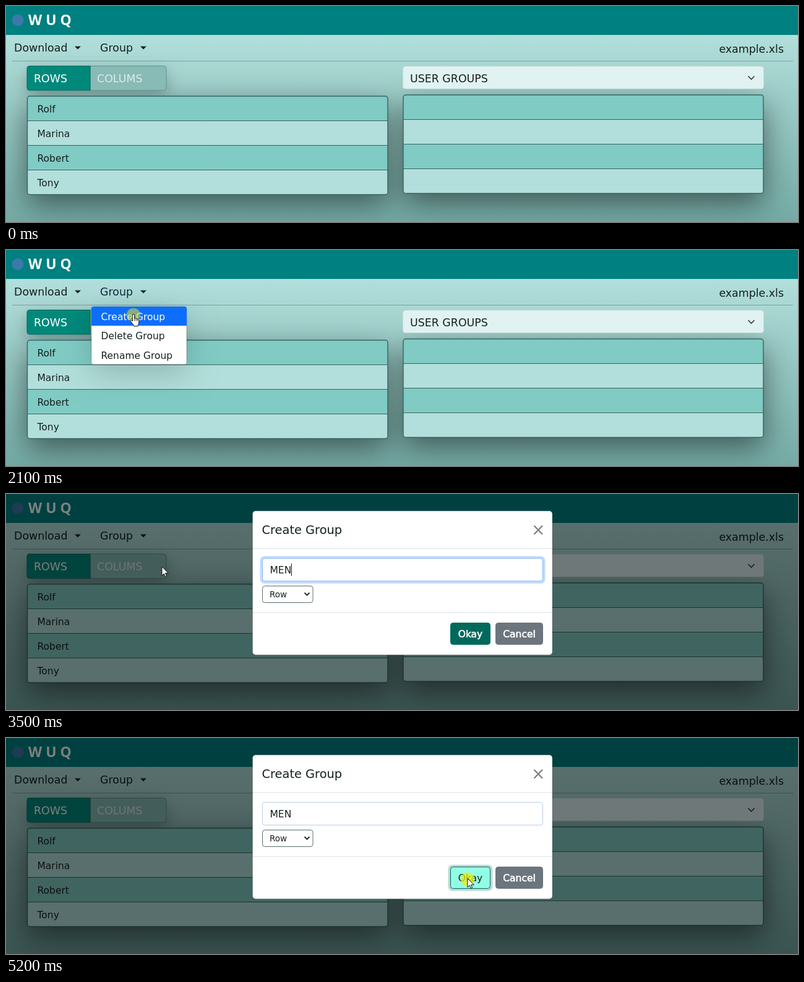
Animation of 1280x351 px, one loop 5.3 s. Source, as an HTML page with a canvas:

```html
<!DOCTYPE html>
<html lang="en">
<head>
<meta charset="utf-8">
<title>Group editor</title>
<style>
  html, body { margin: 0; width: 100%; height: 100%; overflow: hidden; background: #008080; }
  canvas { display: block; width: 1280px; height: 351px; }
</style>
</head>
<body>
<canvas id="stage" width="1280" height="351"></canvas>
<script>
const ctx = document.getElementById('stage').getContext('2d');
const LOOP = 5300, STEP = 100;
const SANS = '"DejaVu Sans", Verdana, sans-serif';
const SMALL = 15.5, MEDIUM = 17.4, LARGE = 19.4;
const INK = '#16211f', BORDER = '#35655f';
const HAND = new Path2D('M4 12V2a1.6 1.6 0 0 1 3.2 0v5.5a1.4 1.4 0 0 1 2.6.6a1.3 1.3 0 0 1 2.4.7' +
  'a1.2 1.2 0 0 1 2.2.9V14q0 3-1.7 4.5V20H6V18.5L1 12q-1.2-2 .6-2.3 1.2 0 2.4 2z');
const ARROW = new Path2D('M0 0V14.6L3.3 11.5L5.4 16.4L7.6 15.5L5.5 10.7H10.2Z');

// Pointer key positions: time, tip x, tip y
const POINTER = [
  [100, 720, 231], [500, 210, 72],
  [1300, 210, 72], [1700, 206, 103],
  [2200, 206, 104], [2500, 252, 118],
  [4100, 252, 118], [4700, 746, 228]
];

// y is the vertical centre of the capitals
function label(text, x, y, size, color = INK, align = 'left') {
  ctx.font = `${size}px ${SANS}`;
  ctx.fillStyle = color;
  ctx.textAlign = align;
  ctx.fillText(text, x, Math.round(y + size * 0.365));
}

function box(x, y, w, h, fill, stroke, radius = 4) {
  ctx.beginPath();
  ctx.roundRect(x, y, w, h, radius);
  ctx.fillStyle = fill;
  ctx.fill();
  if (!stroke) return;
  ctx.strokeStyle = stroke;
  ctx.lineWidth = 1;
  ctx.stroke();
}

function withShadow(alpha, blur, offset, draw) {
  ctx.save();
  ctx.shadowColor = `rgba(0,0,0,${alpha})`;
  ctx.shadowBlur = blur;
  ctx.shadowOffsetY = offset;
  draw();
  ctx.restore();
}

function polyline(points, color, width) {
  ctx.beginPath();
  points.forEach(([x, y]) => ctx.lineTo(x, y));
  ctx.strokeStyle = color;
  ctx.lineWidth = width;
  ctx.stroke();
}

function chevron(x, y, w, h, width) {
  polyline([[x, y], [x + w / 2, y + h], [x + w, y]], '#2b3335', width);
}

function caretDown(x, color) {
  ctx.beginPath();
  ctx.moveTo(x, 65.5);
  ctx.lineTo(x + 10, 65.5);
  ctx.lineTo(x + 5, 70.5);
  ctx.fillStyle = color;
  ctx.fill();
}

function list(x, y, w, names) {
  ctx.save();
  ctx.beginPath();
  ctx.roundRect(x, y, w, 160, 4);
  ctx.clip();
  for (let i = 0; i < 4; i++) {
    ctx.fillStyle = i % 2 ? '#b2dfdb' : '#80cbc4';
    ctx.fillRect(x, y + i * 40, w, 40);
    if (i) polyline([[x, y + i * 40], [x + w, y + i * 40]], BORDER, 1);
    if (names) label(names[i], x + 16, y + i * 40 + 20.5, SMALL);
  }
  ctx.restore();
  ctx.beginPath();
  ctx.roundRect(x, y, w, 160, 4);
  ctx.strokeStyle = BORDER;
  ctx.lineWidth = 1.4;
  ctx.stroke();
}

function drawPage(groupColor) {
  const shade = ctx.createLinearGradient(0, 47, 0, 351);
  shade.addColorStop(0, '#b2dfdb');
  shade.addColorStop(1, '#74aaa4');
  ctx.fillStyle = shade;
  ctx.fillRect(0, 0, 1280, 351);

  withShadow(0.5, 48, 16, () => {
    box(34.5, 146.5, 582.5, 160, '#80cbc4');
    box(642, 144.5, 582, 160, '#80cbc4');
  });

  ctx.fillStyle = '#008080';
  ctx.fillRect(0, 0, 1280, 47);
  ctx.beginPath();
  ctx.arc(19, 23, 9.5, 0, Math.PI * 2);
  ctx.fillStyle = '#3c79a8';
  ctx.fill();
  ctx.font = '600 23px "Noto Sans", "Open Sans", sans-serif';
  ctx.textAlign = 'left';
  ctx.fillStyle = '#fff';
  ctx.fillText('W U Q', 36, 31);

  label('Download', 13, 68, MEDIUM);
  caretDown(111, INK);
  label('Group', 152, 68, MEDIUM, groupColor);
  caretDown(217, groupColor);
  label('example.xls', 1257, 70, MEDIUM, INK, 'right');
  polyline([[10, 89.5], [1272, 89.5]], 'rgba(0,0,0,.25)', 1);

  withShadow(0.25, 26, 8, () => box(34, 97.5, 225, 39.5, '#88bbb5'));
  box(136, 97.5, 123, 39.5, '#88bbb5', '#5d958e', [0, 4, 4, 0]);
  box(34, 97.5, 102, 39.5, '#00897b', '#00695c', [4, 0, 0, 4]);
  label('ROWS', 45, 117.5, MEDIUM, '#fff');
  label('COLUMS', 147, 117.5, MEDIUM, '#d9ecea');

  box(641.5, 98, 583, 36.5, '#e0f2f1', '#c9dcda');
  label('USER GROUPS', 653, 117.5, MEDIUM);
  chevron(1199.5, 114, 10, 5.2, 1.6);

  list(34.5, 146.5, 582.5, ['Rolf', 'Marina', 'Robert', 'Tony']);
  list(642, 144.5, 582);
}

function drawMenu(hovered) {
  withShadow(0.175, 48, 16, () => box(138, 92, 154, 94, '#fff'));
  box(138, 92, 154, 94, '#fff', 'rgba(0,0,0,.25)');
  if (hovered) box(138, 92, 154, 31, '#0d6efd', null, [3, 3, 0, 0]);
  ['Create', 'Delete', 'Rename'].forEach((verb, i) =>
    label(verb + ' Group', 153.5, 108 + i * 31.5, SMALL, hovered && !i ? '#fff' : INK));
}

function button(text, x, w, fill, color, stroke) {
  box(x + 0.5, 209.5, w - 1, 35, fill, stroke);
  label(text, x + w / 2, 227.5, SMALL, color, 'center');
  if (color === '#fff') {
    ctx.strokeStyle = color;
    ctx.lineWidth = 0.6;
    ctx.strokeText(text, x + w / 2, Math.round(227.5 + SMALL * 0.365));
  }
}

function drawDialog(t) {
  const pressed = t >= 5100, hovered = t >= 4700;
  ctx.fillStyle = 'rgba(0,0,0,.5)';
  ctx.fillRect(0, 0, 1280, 351);
  box(398.5, 27.5, 484.5, 234, '#fff', 'rgba(0,0,0,.2)', 5);
  label('Create Group', 413.5, 58, LARGE);
  polyline([[853.5, 51.5], [867, 65.5]], '#7c7c7c', 2.2);
  polyline([[867, 51.5], [853.5, 65.5]], '#7c7c7c', 2.2);
  [88.5, 192.5].forEach(y => polyline([[399, y], [883, y]], '#dee2e6', 1));

  if (!pressed) box(410.5, 101, 461, 44.5, '#c2dbfe', null, 7);
  box(414.5, 104.5, 453, 37, '#fff', pressed ? '#b9cde6' : '#86b7fe');
  const typed = 'MEN'.slice(0, t < 3100 ? 0 : Math.floor((t - 3100) / 200) + 1);
  label(typed || 'Group Name', 426.5, 123, SMALL, typed ? INK : '#6c757d');
  const caretOn = t < 2900 || (t >= 3100 && t < 3900) || (t >= 4400 && t < 4700);
  if (caretOn) {
    const x = Math.floor(427 + (typed ? ctx.measureText(typed).width : 0));
    ctx.fillStyle = INK;
    ctx.fillRect(x, 113, 1, 20);
  }

  box(414.5, 149.5, 81.5, 27, '#fff', '#56706d');
  label('Row', 426, 163.5, 13.5);
  chevron(482.5, 160.5, 8, 4, 2);

  if (pressed) box(714.5, 206, 72, 42.5, '#bfd9d5', null, 7);
  if (hovered) button('Okay', 718, 65, '#90ffe3', INK, '#00695c');
  else button('Okay', 718, 65, '#00695c', '#fff', '#00695c');
  button('Cancel', 791, 77, '#6c757d', '#fff', '#6c757d');
}

function pointerAt(t) {
  let i = POINTER.findIndex(key => key[0] > t);
  if (i < 0) i = POINTER.length;
  const from = POINTER[i - 1], to = POINTER[i] || from;
  // Between 1700 and 2200 the pointer rests
  const p = to === from ? 0 : (t - from[0]) / (to[0] - from[0]);
  const eased = p * p * (3 - 2 * p);
  return [from[1] + (to[1] - from[1]) * eased, from[2] + (to[2] - from[2]) * eased];
}

function drawPointer(t) {
  if (t < 100) return;
  const [x, y] = pointerAt(t);
  const hand = (t >= 500 && t < 2200) || (t >= 4700 && t < 5200);
  if (t === 1100 || t === 2100 || t >= 5100) {
    ctx.beginPath();
    ctx.arc(x, y + 1.5, 11, 0, Math.PI * 2);
    ctx.fillStyle = t >= 5100 ? 'rgba(235,235,20,.75)' : 'rgba(215,215,50,.6)';
    ctx.fill();
  }
  ctx.save();
  ctx.translate(hand ? x - 5.6 : x, y);
  const shape = hand ? HAND : ARROW;
  ctx.fillStyle = '#fff';
  ctx.fill(shape);
  ctx.strokeStyle = '#111';
  ctx.lineWidth = 1;
  ctx.stroke(shape);
  if (hand) [7.2, 9.8, 12.2].forEach(fx => polyline([[fx, 8], [fx, 11.5]], '#111', 0.9));
  ctx.restore();
}

function render(now) {
  const t = Math.floor((now % LOOP) / STEP) * STEP;
  const groupColor = t >= 500 && t < 2100 ? '#1259c9' : t === 2100 ? '#12283f' : INK;
  drawPage(groupColor);
  if (t >= 1200 && t < 2200) drawMenu(t >= 1500);
  if (t >= 2200) drawDialog(t);
  drawPointer(t);
  requestAnimationFrame(render);
}
requestAnimationFrame(render);
</script>
</body>
</html>
```
